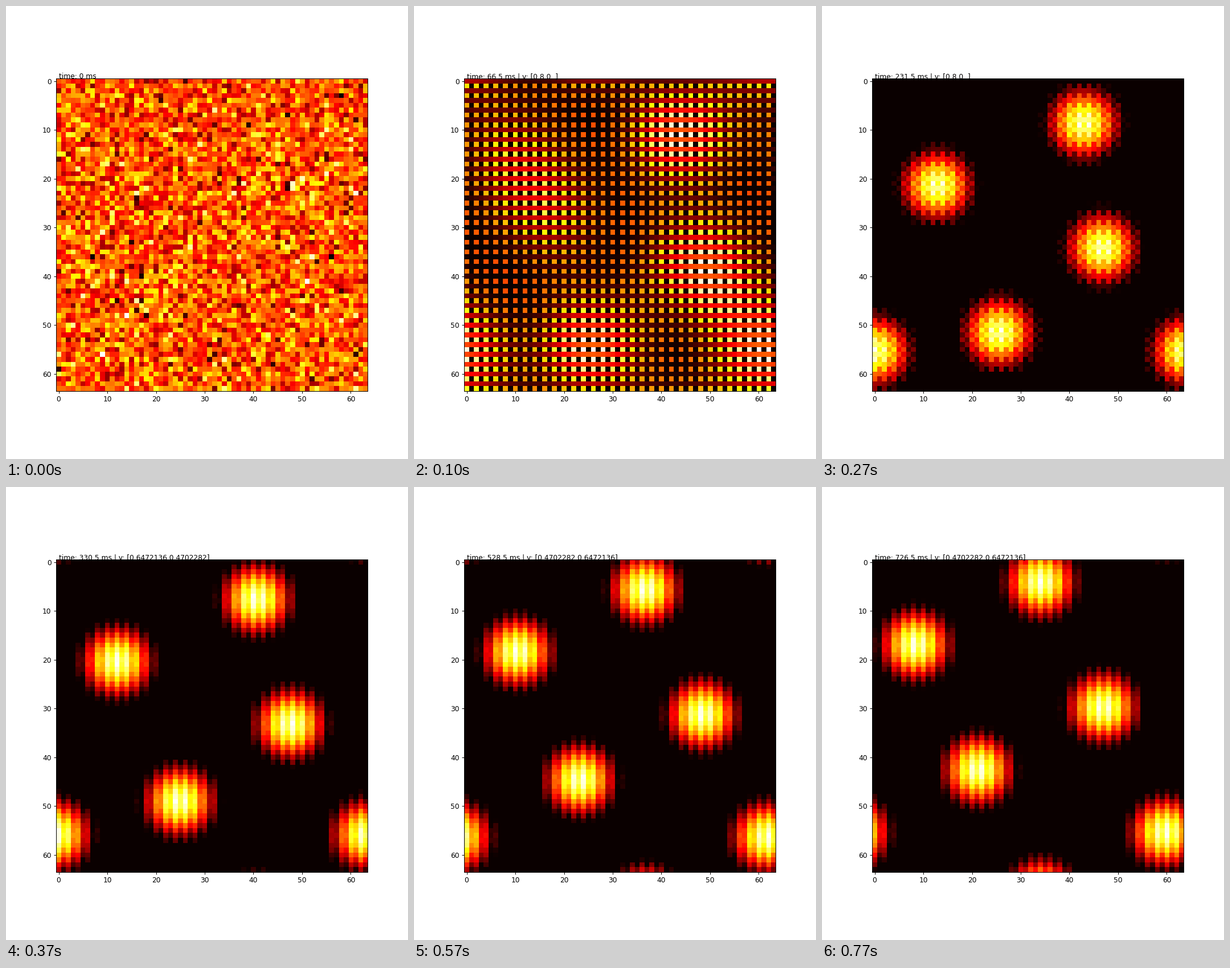
Recreate the animation shown at these times as a matplotlib script. Size 706 by 794 pixels, loop 810 ms.

```python
import numpy as np
import matplotlib.pyplot as plt
from matplotlib.animation import FuncAnimation

N = 64          # neurons per side of the periodic sheet
STEPS = 24      # pictures in one loop
SPEED = 0.8
WIDTH = 6       # spread of a grown bump
SETTLED = 5     # step at which the bumps stand out and start to relax
DPI = 88.25

# Points on the sheet are complex numbers, x + iy.
ORIGIN = 38.4 + 12j
SPACING = (-2 + 1j) * N / 5

# One row per lattice site: direction of its early displacement and
# the places, relative to the site, of the two halves that merge into it.
SITES = [
    (1, 1.5 - 1j, -1.5 + 1.5j),
    (0, -3.6 - 8.7j, 4.7 + 4.8j),
    (-1, 5.5 + 2.5j, -0.7 + 0.5j),
    (1j, 0, 0),
    (-1j, 0, -5 - 3j),
]

rng = np.random.default_rng(7)
Y, X = np.mgrid[:N, :N]
noise = np.clip(rng.normal(0.48, 0.155, (N, N)), 0, 1)


def sim_time(step):
    return 33 * step - 32.5


def velocity(step):
    t = sim_time(step)
    angle = 0 if t < 250 else np.pi / 5 if t < 500 else np.pi / 2 - np.pi / 5
    return SPEED * np.exp(1j * angle)


def drive(v):
    """Input of the four direction types, tiled two by two."""
    g = np.ones((N, N))
    g[1::2, ::2] += v.real
    g[1::2, 1::2] -= v.real
    g[::2, ::2] += v.imag
    g[::2, 1::2] -= v.imag
    return g


def gauss(centre, s):
    dx = (X - centre.real + N / 2) % N - N / 2
    dy = (Y - centre.imag + N / 2) % N - N / 2
    return np.exp(-(dx**2 + dy**2) / (2 * s**2))


def bumps(step):
    """Five bumps that narrow, merge, relax to a lattice and drift."""
    age = max(step - SETTLED, 0)
    blur = max(SETTLED - step, 0)
    split = max(1 - age / 3, 0)
    push = 5.2 * np.exp(-(age / 8)**2)
    drift = sum(1j * np.conj(velocity(k)) for k in range(1, step + 1))
    site = ORIGIN - 0.525 * drift
    total = np.zeros((N, N))
    for nudge, first, second in SITES:
        stretch = abs(split * (first - second))**2 / 250
        weight = 1.45 + 0.25 * stretch
        for half in (first, second):
            centre = site + push * nudge + split * half
            total += weight / 2 * gauss(centre, WIDTH + blur + stretch)
        site += SPACING
    return total


def activity(step):
    g = drive(velocity(step))
    if step < 2:
        r = noise + 0.28 * step * g
    else:
        growth = 7 / (1 + np.exp(-1.6 * (step - 4.29)))
        r = np.maximum(g - 0.9 + growth * (bumps(step) - 0.56), 0)
    return (r - r.min()) / (r.max() - r.min())


def caption(step):
    if step == 0:
        return "time: 0 ms"
    v = velocity(step)
    return f"time: {sim_time(step)} ms | v: {np.array([v.real, v.imag])}"


sheets = [activity(k) for k in range(STEPS)]

fig, ax = plt.subplots(figsize=(706 / DPI, 794 / DPI), dpi=DPI)
image = ax.imshow(sheets[0], cmap="hot", vmin=0, vmax=1)
label = ax.text(0, -0.5, caption(0))


def update(tick):
    # Ticks last 10 ms; the picture changes thirty times a second.
    step = min((3 * tick + 1) // 10, STEPS - 1)
    image.set_data(sheets[step])
    label.set_text(caption(step))
    return image, label


anim = FuncAnimation(fig, update, frames=81, interval=10, repeat=True,
                     repeat_delay=0)
plt.show()
```
